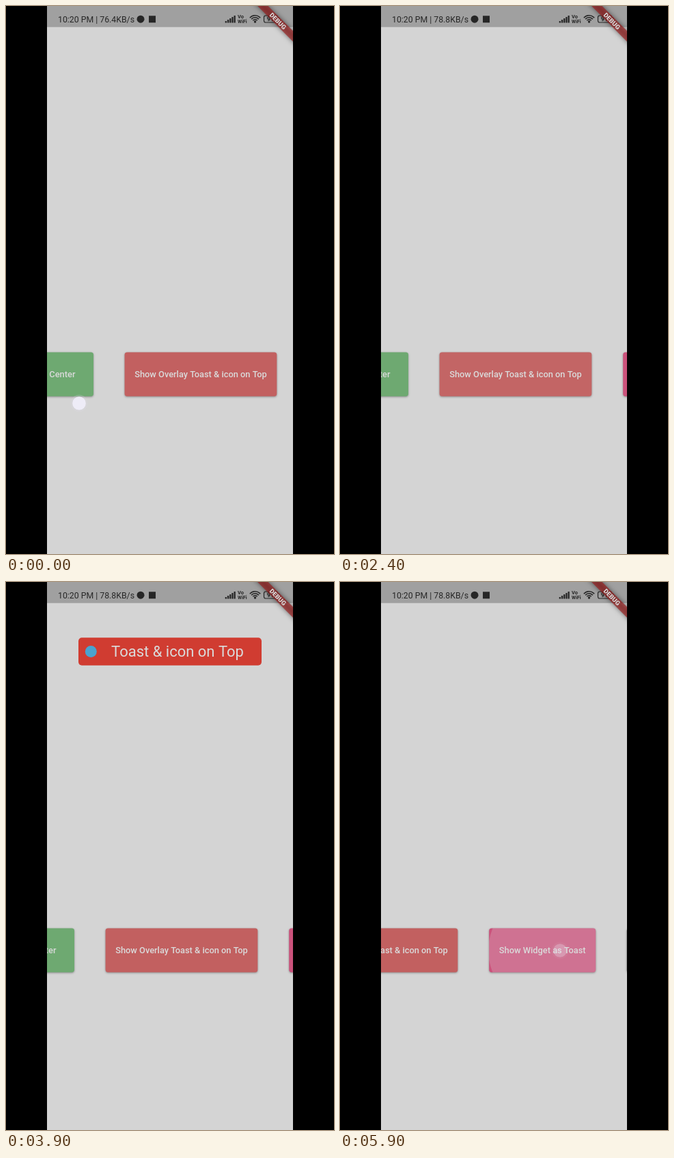
Write an HTML page with a canvas that moves like this. It is 480 px wide and 800 px high and loops after 6 s.

```html
<!DOCTYPE html>
<html lang="en">
<head>
<meta charset="utf-8">
<style>
  html, body { margin: 0; width: 100%; height: 100%; overflow: hidden; background: #000; }
  canvas { display: block; }
</style>
</head>
<body>
<canvas id="stage" width="480" height="800"></canvas>
<script>
const g = document.getElementById('stage').getContext('2d');
const LOOP = 6000, STEP = 100;
const WHITE = '#dadada', INK = '#262626';
const BTN_Y = 505.5, BTN_H = 64.3;

const clamp = v => Math.min(1, Math.max(0, v));
const phase = (t, from, to) => clamp((t - from) / (to - from));
const easeOut = p => 1 - (1 - p) ** 3;
const mix = (a, b, p) => a + (b - a) * p;

// The standard "ease" curve, cubic-bezier(.25, .1, .25, 1)
function ease(x) {
  let lo = 0, hi = 1, u = 0.5;
  const bez = (a, b) => 3 * a * u * (1 - u) ** 2 + 3 * b * u * u * (1 - u) + u ** 3;
  for (let i = 0; i < 20; i++) {
    u = (lo + hi) / 2;
    if (bez(0.25, 0.25) < x) lo = u; else hi = u;
  }
  return bez(0.1, 1);
}

function box(x, y, w, h, r, color) {
  g.beginPath();
  g.roundRect(x, y, w, h, r);
  g.fillStyle = color;
  g.fill();
}

function disc(x, y, r, color) {
  g.beginPath();
  g.arc(x, y, r, 0, 7);
  g.fillStyle = color;
  g.fill();
}

function label(str, x, y, size, color, weight = 400, align = 'left') {
  g.font = `${weight} ${size}px Roboto, sans-serif`;
  g.textAlign = align;
  g.fillStyle = color;
  g.fillText(str, x, y);
}

function shadow(color, blur, dy) {
  g.shadowColor = color;
  g.shadowBlur = blur;
  g.shadowOffsetY = dy;
}

function button(x, w, color, str, ripple) {
  g.save();
  shadow('rgba(0,0,0,.35)', 3, 1);
  box(x, BTN_Y, w, BTN_H, 3.7, color);
  g.restore();
  if (ripple) {
    const { p, alpha, touchX, touchY } = ripple;
    const full = Math.hypot(w, BTN_H) / 2 + 5;
    g.save();
    g.beginPath();
    g.roundRect(x, BTN_Y, w, BTN_H, 3.7);
    g.clip();
    disc(mix(touchX, x + w / 2, p), mix(touchY, BTN_Y + BTN_H / 2, p),
      full * mix(0.3, 1, p), `rgba(216,216,216,${0.24 * alpha})`);
    g.restore();
  }
  label(str, x + w / 2, 542.2, 12.83, WHITE, 500, 'center');
}

function rippleAt(t, start, touchX, touchY) {
  if (t < start || t > start + 660) return null;
  return {
    p: ease(phase(t, start, start + 330)),
    alpha: 1 - phase(t, start + 330, start + 660),
    touchX, touchY
  };
}

function pointer(x, y, alpha) {
  if (alpha <= 0) return;
  disc(x, y, 12.5, `rgba(225,220,230,${0.22 * alpha})`);
  disc(x, y, 9.8, `rgba(238,236,247,${alpha})`);
}

function statusBar(t) {
  box(60, 0, 360, 30.7, 0, '#a0a0a0');
  label(`10:20 PM | ${t < 2300 ? '76.4' : '78.8'}KB/s`, 76, 24, 12.3, INK);
  disc(197, 19.2, 5.5, INK);
  box(209, 14.3, 10, 10, 0, INK);
  for (let i = 0; i < 5; i++) box(320.7 + i * 3.2, 22 - i * 2, 2.3, 2.4 + i * 2, 0.5, INK);
  label('Vo', 339, 18.3, 7.5, INK, 700);
  label('WiFi', 339, 25, 7, INK, 700);

  g.strokeStyle = INK;
  g.lineWidth = 1.6;
  for (const r of [4.2, 7.2, 10.2]) {
    g.beginPath();
    g.arc(364.5, 24, r, -Math.PI * 0.77, -Math.PI * 0.23);
    g.stroke();
  }
  disc(364.5, 23, 1.7, INK);

  g.lineWidth = 1.2;
  g.beginPath();
  g.roundRect(377.5, 14, 20, 10, 2.5);
  g.stroke();
  box(398.8, 17, 1.4, 4, 0.5, INK);
  label('91', 387, 22.1, 8.5, INK, 700, 'center');
}

function banner() {
  g.save();
  g.translate(420, 0);
  g.rotate(Math.PI / 4);
  shadow('rgba(0,0,0,.8)', 7, 0);
  box(-50, 25.7, 100, 11, 0, 'rgba(155,24,24,.63)');
  shadow('transparent', 0, 0);
  label('DEBUG', 0, 34.5, 9.35, WHITE, 900, 'center');
  g.restore();
}

function toast(t) {
  const p = Math.min(phase(t, 2560, 3130), 1 - phase(t, 5050, 5600));
  if (p <= 0) return;
  g.save();
  g.globalAlpha = p;
  g.translate(0, -40.5 * (1 - p));
  box(106, 81.2, 268, 40.6, 5, '#d03c31');
  disc(124.3, 101.6, 8.5, '#4aa3cf');
  label('Toast & icon on Top', 251, 109.2, 22, WHITE, 400, 'center');
  g.restore();
}

function draw(t) {
  const drag = easeOut(phase(t, 4330, 5000));
  const scroll = 28 * (1 - easeOut(phase(t, 0, 700))) - 196 * drag;

  g.fillStyle = '#000';
  g.fillRect(0, 0, 480, 800);
  g.save();
  g.beginPath();
  g.rect(60, 0, 360, 800);
  g.clip();
  box(60, 0, 360, 800, 0, '#d4d4d4');

  button(-121.5 + scroll, 221.5, '#6ea971', 'Show Overlay Toast at Center');
  button(145.6 + scroll, 222.7, '#c26060', 'Show Overlay Toast & icon on Top',
    rippleAt(t, 1794, 314, 546));
  button(414.2 + scroll, 156, '#cb527b', 'Show Widget as Toast',
    rippleAt(t, 5702, 322, 538));
  button(615.7 + scroll, 160, '#777', '');

  toast(t);
  statusBar(t);
  banner();

  if (t < 300) pointer(79 + scroll, 580 + t / 60, 1 - phase(t, 0, 300));
  if (t >= 1800 && t < 2200) pointer(314, 546, 0.5 * (1 - phase(t, 1900, 2150)));
  if (t >= 4400 && t < 4800) pointer(320 - 196 * drag, 580, 0.9 * (1 - phase(t, 4600, 4800)));
  if (t >= 5800) pointer(322, 538, 0.28);
  g.restore();
}

const begin = performance.now();
function tick() {
  const t = (performance.now() - begin) % LOOP;
  draw(Math.floor(t / STEP) * STEP);
  requestAnimationFrame(tick);
}
tick();
</script>
</body>
</html>
```
